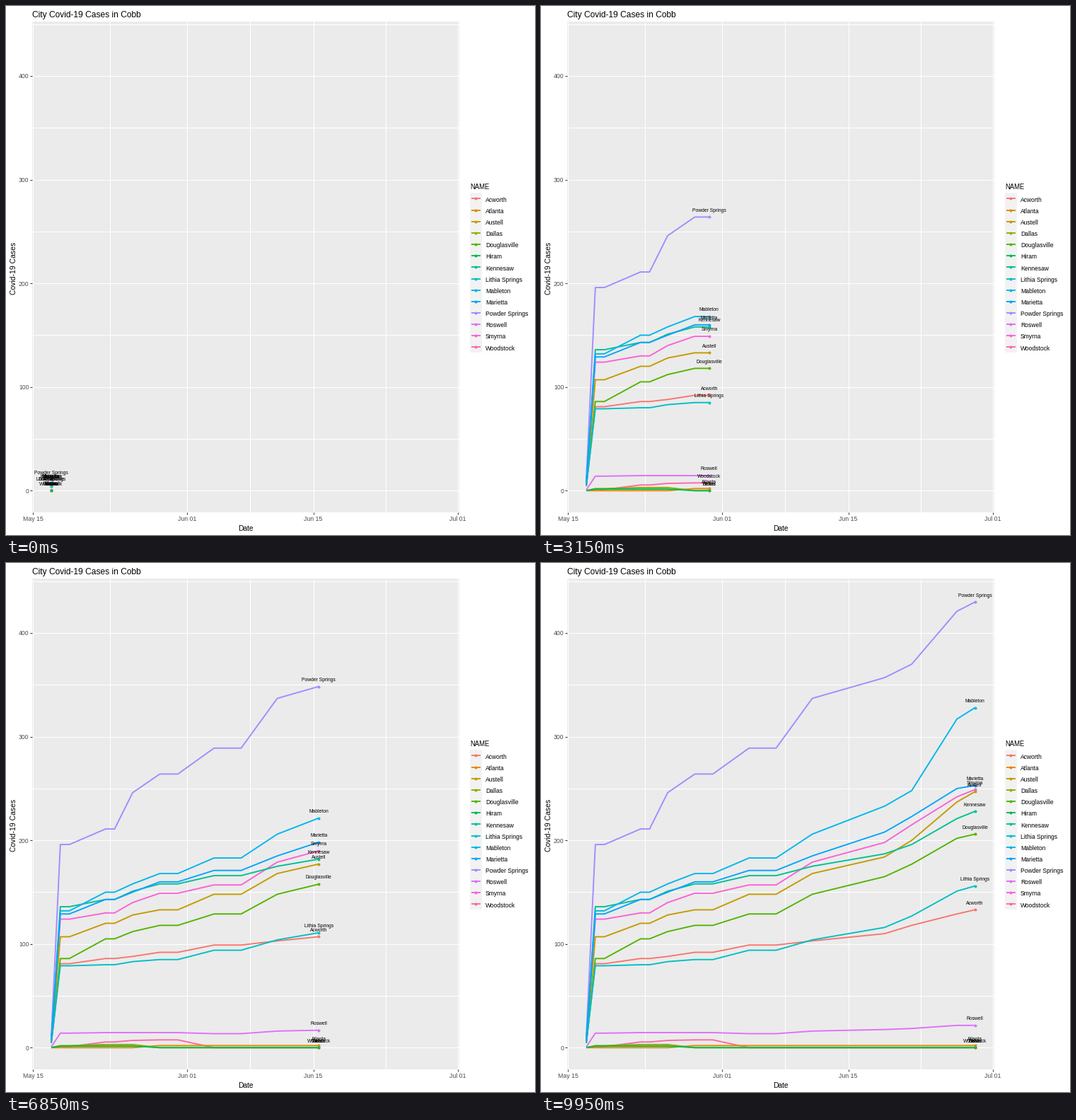
Animation of 748 by 748 pixels, one loop 10000 ms. Source, as a matplotlib script:

```python
import numpy as np
import matplotlib.pyplot as plt
from matplotlib.animation import FuncAnimation
from matplotlib.patches import Rectangle

SIZE = 748
FRAMES = 200
FIRST, LAST = 2, 45          # days after May 15
LEFT, RIGHT, TOP, BOTTOM = 36.5, 640.5, 21.5, 715.5

# Every report lands on a whole frame; between reports time runs evenly.
DAYS = np.array([d for d in range(FIRST, LAST + 1)
                 if d not in (7, 13, 21, 28, 34, 44)])
STOPS = np.round((FRAMES - 1) * (DAYS - FIRST) / (LAST - FIRST))

# Counts grow between turning days; some levels hold for a few days.
TURNS = (2, 3, 4, 8, 9, 11, 14, 16, 20, 23, 27, 35, 38, 43, 45)
HOLDS = (1, 2, 2, 1, 2, 2, 1, 1, 1, 1, 1)

CITIES = {
    "Acworth": (81, 86, 88, 92, 99, 103, 110, 118, 129, 133),
    "Atlanta": (0, 0, 0, 2),
    "Austell": (107, 120, 128, 133, 148, 168, 184, 200, 237, 247),
    "Dallas": (2, 3, 3, 0),
    "Douglasville": (86, 105, 112, 118, 129, 148, 165, 177, 202, 206),
    "Hiram": (1.5, 1.5, 1.5, 0),
    "Kennesaw": (136, 143, 151, 158, 166, 175, 187, 196, 221, 228),
    "Lithia Springs": (79, 80, 83, 85, 94, 104, 116, 127, 151, 156),
    "Mableton": (132, 150, 158, 168, 183, 206, 233, 248, 317, 328),
    "Marietta": (129, 143, 150, 160, 171, 185, 208, 223, 250, 253),
    "Powder Springs": (196, 211, 246, 264, 289, 337, 357, 370, 421, 430),
    "Roswell": (14, 14.5, 14.5, 14.5, 13.5, 16, 17.5, 18.5, 21.5, 21.5),
    "Smyrna": (124, 130, 140, 149, 157, 179, 198, 215, 242, 249),
    "Woodstock": (1, 5.5, 7, 7.5, 0),
}
COLORS = ("#F8766D #E38900 #C49A00 #99A800 #53B400 #00BC56 #00C094 "
          "#00BFC4 #00B6EB #06A4FF #A58AFF #DF70F8 #FB61D7 #FF66A8").split()

plt.rcParams["font.family"] = "Liberation Sans"
fig = plt.figure(figsize=(SIZE / 72, SIZE / 72), dpi=72, facecolor="white")
ax = fig.add_axes([0, 0, 1, 1])
ax.set_xlim(-0.5, SIZE - 0.5)
ax.set_ylim(SIZE - 0.5, -0.5)
ax.axis("off")


def px(day):
    return 38 + 12.78 * np.asarray(day)


def py(cases):
    return 684.8 - 1.4655 * np.asarray(cases)


def case_counts(levels):
    """Daily counts: a small start, then the levels; the last one stays."""
    start = 0.055 * levels[0]
    tail = [levels[-1]] * (len(HOLDS) - 1 - len(levels))
    values = np.repeat([start, *levels, *tail], HOLDS)
    return np.interp(DAYS, TURNS, values)


def label(x, y, text, size, color="black", **kw):
    return ax.text(x, y, text, fontsize=size, color=color, **kw)


def stroke(xs, ys, color, width, z):
    return ax.plot(xs, ys, color=color, lw=width, zorder=z,
                   solid_capstyle="butt", solid_joinstyle="round")[0]


def dot(x, y, color, z):
    return ax.plot([x], [y], "o", color=color, ms=4, mew=0, zorder=z)[0]


def box(x, y, w, h, color):
    ax.add_patch(Rectangle((x, y), w, h, color=color, lw=0, zorder=0))


def draw_panel():
    box(LEFT, TOP, RIGHT - LEFT, BOTTOM - TOP, "#EBEBEB")
    dates = {0: "May 15", 17: "Jun 01", 31: "Jun 15", 47: "Jul 01"}
    for day in (*dates, 8.5, 24, 39):
        x = px(day)
        stroke([x, x], [TOP, BOTTOM], "white", 1, 1)
        if day in dates:
            stroke([x, x], [BOTTOM, BOTTOM + 3], "#333333", 1, 1)
            label(x, 728, dates[day], 8.7, "#4D4D4D", ha="center")
    for cases in range(0, 451, 50):
        y = py(cases)
        stroke([LEFT, RIGHT], [y, y], "white", 1, 1)
        if cases % 100 == 0:
            stroke([LEFT - 3, LEFT], [y, y], "#333333", 1, 1)
            label(32, y + 3.4, str(cases), 8.6, "#4D4D4D", ha="right")
    label(36.5, 15.5, "City Covid-19 Cases in Cobb", 12)
    label(338.5, 741.5, "Date", 10.2, ha="center")
    label(11, 370, "Covid-19 Cases", 10.4, rotation=90,
          ha="center", va="center")
    label(656, 259, "NAME", 9.5)
    box(655.5, 263.5, 17, 226.5, "#F2F2F2")


class City:
    def __init__(self, row, name, levels, color):
        self.counts = case_counts(levels)
        z = (row + 4) % len(CITIES)      # warm pinks lie underneath
        self.line = stroke([], [], color, 1.9, 10 + z)
        self.dot = dot(0, 0, color, 40 + z)
        self.text = label(0, 0, name, 6.75, ha="center", zorder=70 + z)
        y = 272 + 16.15 * row
        stroke([657.5, 670.5], [y, y], color, 1.9, 2)
        dot(664, y, color, 3)
        label(677.5, y + 4.2, name, 8.55)

    def show(self, day):
        past = DAYS < day
        now = np.interp(day, DAYS, self.counts)
        xs = px(np.append(DAYS[past], day))
        ys = py(np.append(self.counts[past], now))
        self.line.set_data(xs, ys)
        self.dot.set_data(xs[-1:], ys[-1:])
        self.text.set_position((xs[-1], ys[-1] - 7.6))


draw_panel()
cities = [City(row, name, levels, color) for row, ((name, levels), color)
          in enumerate(zip(CITIES.items(), COLORS))]


def update(frame):
    day = np.interp(frame, STOPS, DAYS)
    for city in cities:
        city.show(day)
    return []


anim = FuncAnimation(fig, update, frames=FRAMES, interval=50,
                     repeat=True, repeat_delay=0)
plt.show()
```
